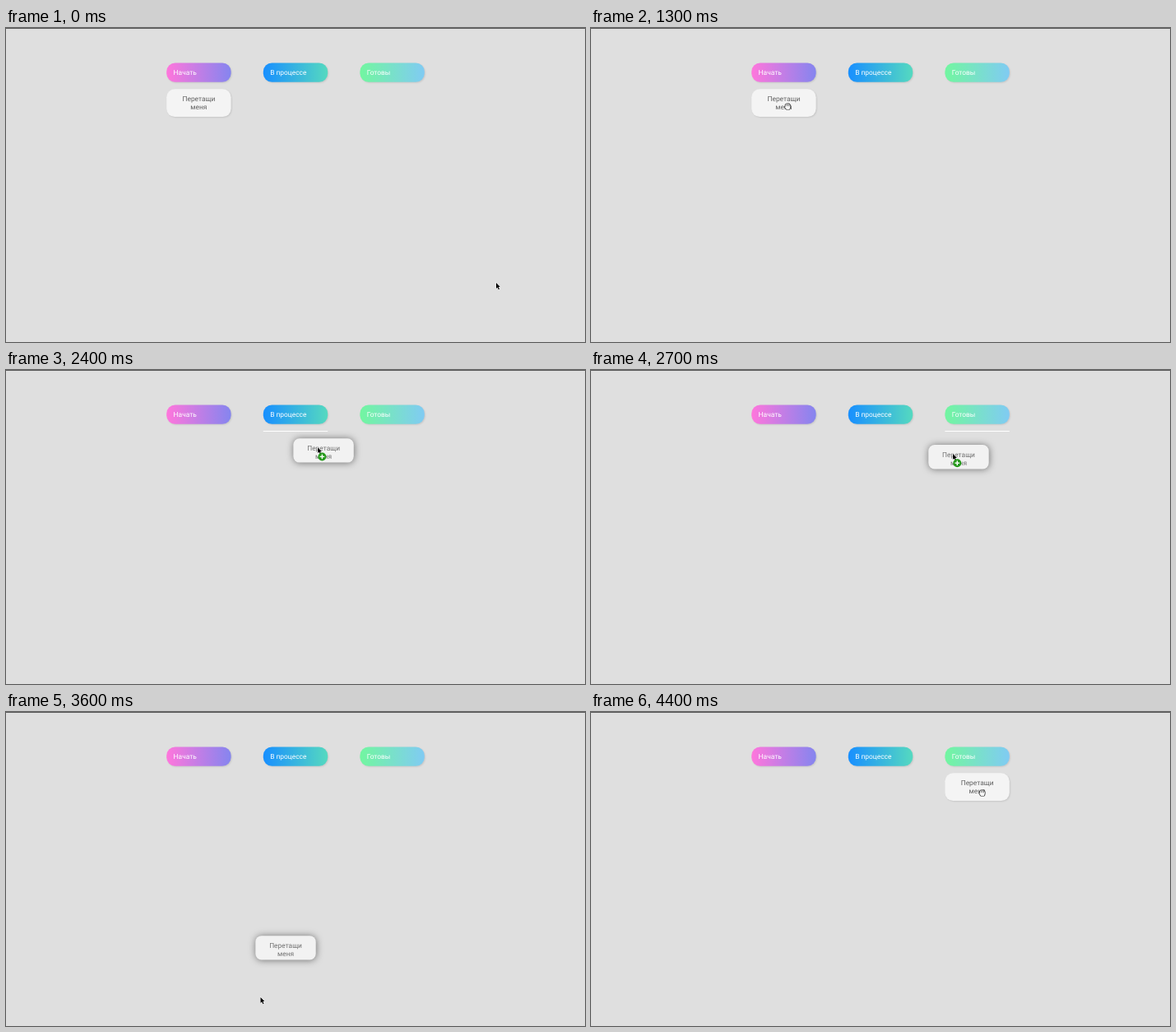
Animation of 704 by 382 pixels, one loop 4.6 s. Source, as an HTML page with a canvas:

```html
<!DOCTYPE html>
<html lang="ru">
<head>
<meta charset="utf-8">
<style>
  html, body { margin: 0; width: 100%; height: 100%; overflow: hidden; background: #dfdfdf; }
  canvas { display: block; }
</style>
</head>
<body>
<canvas id="stage" width="704" height="382"></canvas>
<script>
const ctx = document.getElementById('stage').getContext('2d');
const LOOP = 4600, STEP = 100, FLIGHT = 350;
const COLUMN_W = 78.4, CARD_Y = 74.3, CARD_H = 33.8;

const columns = [
  { title: 'Начать', from: '#ff76dc', to: '#8585ef' },
  { title: 'В процессе', from: '#188fff', to: '#55d9c0' },
  { title: 'Готовы', from: '#72f6a0', to: '#80cbf3' }
].map((column, i) => ({ ...column, x: 195.2 + i * 1.5 * COLUMN_W }));

const pointerStart = { x: 596, y: 310 };
const pointerMoves = [
  { start: 0, end: 100, x: 218, y: 46 },
  { start: 100, end: 200, x: 265, y: 165 },
  { start: 300, end: 700, x: 234, y: 106 },
  { start: 800, end: 1000, x: 240, y: 58 },
  { start: 1000, end: 1300, x: 239, y: 95.5 },
  { start: 1300, end: 1480, x: 350, y: 105 },
  { start: 1480, end: 1900, x: 356, y: 106 },
  { start: 2000, end: 2200, x: 346, y: 90 },
  { start: 2200, end: 2700, x: 440, y: 102 },
  { start: 2700, end: 3200, x: 489, y: 93 },
  { start: 3200, end: 3500, x: 309.5, y: 347 },
  { start: 3800, end: 4400, x: 475.5, y: 98.5 }
];

// dx, dy: from the pointer to the middle of the dragged copy.
// A drag with a release time misses the columns and flies back.
const drags = [
  { grab: 1400, drop: 2000, to: 1, dx: -3, dy: -4.5 },
  { grab: 2300, drop: 2900, to: 2, dx: 7, dy: 3.5 },
  { grab: 3300, release: 3500, drop: 3900, to: 2, dx: -1.5, dy: -12 }
];

function ease(k) {
  k = Math.min(1, Math.max(0, k));
  return k * k * (3 - 2 * k);
}

function mix(a, b, k) {
  return { x: a.x + (b.x - a.x) * k, y: a.y + (b.y - a.y) * k };
}

function pointerAt(t) {
  return pointerMoves.reduce(
    (p, move) => mix(p, move, ease((t - move.start) / (move.end - move.start))),
    pointerStart
  );
}

function ghostAt(drag, pointer, t) {
  const held = { x: pointer.x + drag.dx, y: pointer.y + drag.dy };
  const home = { x: columns[drag.to].x + COLUMN_W / 2, y: CARD_Y + CARD_H / 2 };
  return drag.release ? mix(held, home, ease((t - drag.release) / FLIGHT)) : held;
}

function box(x, y, w, h, r, fill, shadow, blur, offset) {
  ctx.save();
  ctx.shadowColor = shadow;
  ctx.shadowBlur = blur;
  ctx.shadowOffsetX = ctx.shadowOffsetY = offset;
  ctx.fillStyle = fill;
  ctx.beginPath();
  ctx.roundRect(x, y, w, h, r);
  ctx.fill();
  ctx.restore();
}

function text(str, x, y, color, align) {
  ctx.font = '8.4px Roboto, sans-serif';
  ctx.textRendering = 'geometricPrecision';
  ctx.textAlign = align;
  ctx.fillStyle = color;
  ctx.fillText(str, x, y);
}

function label(x, y, color) {
  text('Перетащи', x, y, color, 'center');
  text('меня', x, y + 10, color, 'center');
}

function header({ x, title, from, to }) {
  const fill = ctx.createLinearGradient(x, 0, x + COLUMN_W, 0);
  fill.addColorStop(0, from);
  fill.addColorStop(1, to);
  box(x, 42.4, COLUMN_W, 23.4, 10.5, fill, 'rgba(0,0,0,.11)', 2, 1);
  text(title, x + 8.4, 57.1, '#fff', 'left');
}

function card({ x }) {
  box(x, CARD_Y, COLUMN_W, CARD_H, 10, '#f4f4f4', 'rgba(0,0,0,.11)', 2, 1);
  label(x + COLUMN_W / 2, CARD_Y + 15, '#5f5f5f');
}

function ghost({ x, y }) {
  box(x - 36.7, y - 14.5, 73.4, 29.4, 7.5, '#f2f2f2', 'rgba(0,0,0,.5)', 9, 0.4);
  label(x, y + 0.6, '#707070');
}

function shape(path, { x, y }, fill, stroke, width) {
  ctx.save();
  ctx.translate(x, y);
  ctx.lineJoin = ctx.lineCap = 'round';
  ctx.strokeStyle = stroke;
  ctx.lineWidth = width;
  ctx.fillStyle = fill;
  ctx.stroke(path);
  ctx.fill(path);
  ctx.restore();
}

const arrow = new Path2D('M0 0V6.9L1.6 5.5L2.8 8.2L4 7.7L2.8 5H4.9Z');
const fist = new Path2D('M-2.6 0V-2Q-1.2 -3.8 0 -3Q1.8 -3.8 2.6 -2.2Q3.6 -2 3.4 0Q3.4 2 2.3 3.4H-1.2Q-4.6 0 -2.6 0Z');
const knuckles = new Path2D('M-1 -2.4V-.8M.7 -2.5V-.8M2.2 -2V-.6');

function hand(p) {
  shape(fist, p, '#f4f4f4', '#222', 1.4);
  shape(knuckles, p, 'transparent', '#444', 0.6);
}

function plusBadge(x, y) {
  ctx.fillStyle = '#25991b';
  ctx.beginPath();
  ctx.arc(x, y, 5, 0, 7);
  ctx.fill();
  ctx.fillStyle = '#fff';
  ctx.fillRect(x - 2.8, y - 0.7, 5.6, 1.4);
  ctx.fillRect(x - 0.7, y - 2.8, 1.4, 5.6);
}

function draw(t) {
  const pointer = pointerAt(t);
  const drag = drags.find(d => t >= d.grab && t < d.drop);
  const dropped = drags.filter(d => t >= d.drop).pop();
  const home = columns[dropped ? dropped.to : 0];
  const lifted = drag && t >= drag.grab + STEP;
  const overDrop = lifted && pointer.y < 130;
  const overCard = !drag && pointer.x > home.x && pointer.x < home.x + COLUMN_W &&
    pointer.y > CARD_Y && pointer.y < CARD_Y + CARD_H;

  ctx.fillStyle = '#dfdfdf';
  ctx.fillRect(0, 0, 704, 382);
  ctx.fillStyle = '#5c5c5c';
  ctx.fillRect(0, 0, 704, 1);
  columns.forEach(header);

  if (!lifted) card(home);
  if (overDrop) {
    ctx.fillStyle = '#fff';
    ctx.fillRect(columns[pointer.x < 411 ? 1 : 2].x, 74, COLUMN_W, 1);
  }
  if (drag) ghost(ghostAt(drag, pointer, t));

  if (overCard) hand(pointer);
  else shape(arrow, pointer, '#000', '#fff', 0.8);
  if (overDrop) plusBadge(pointer.x + 5.3, pointer.y + 11.2);
}

function tick(now) {
  draw(Math.floor(now % LOOP / STEP) * STEP);
  requestAnimationFrame(tick);
}
requestAnimationFrame(tick);
</script>
</body>
</html>
```
